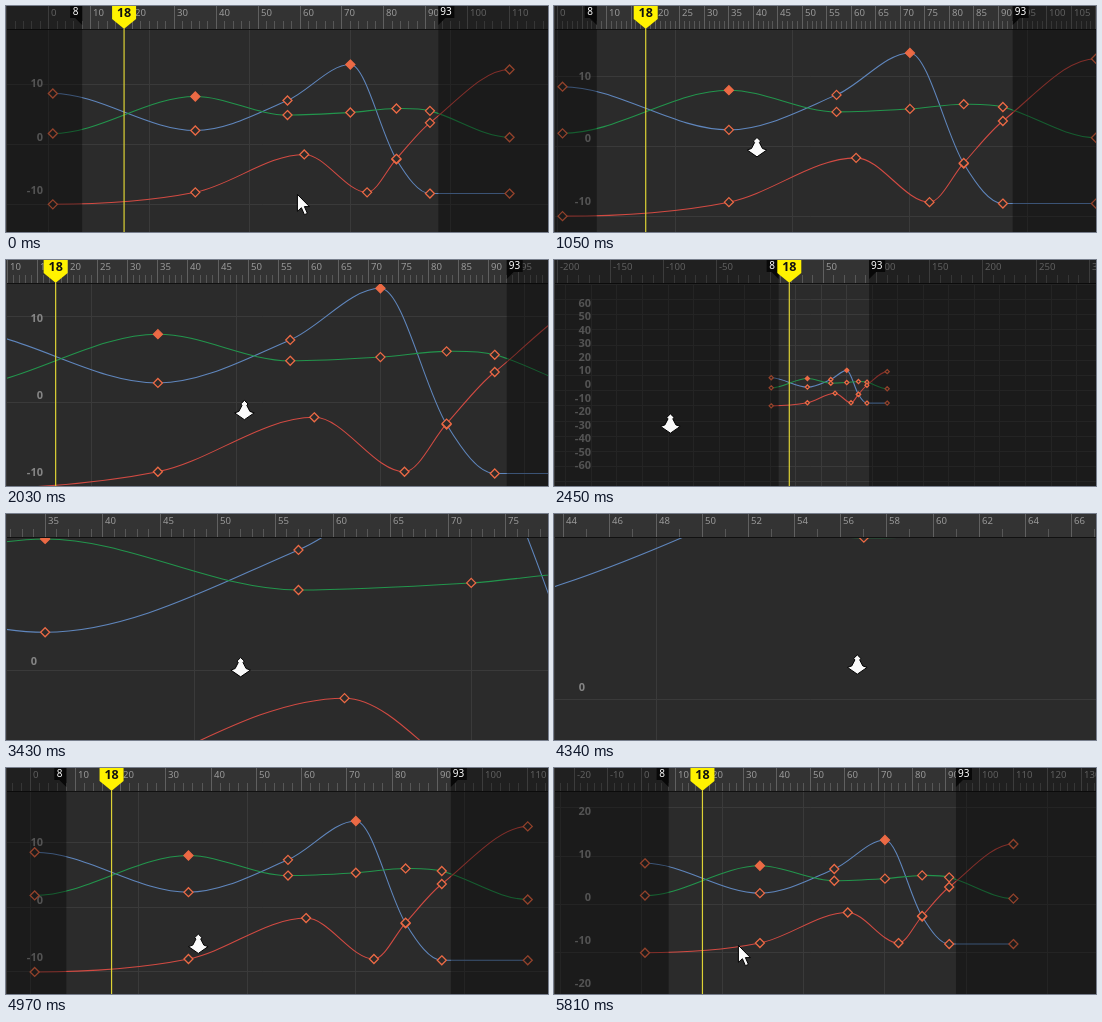
Recreate the animation shown at these times as an HTML page. Size 542x226 px, loop 8.05 s.

```html
<!DOCTYPE html>
<html lang="en">
<head>
<meta charset="utf-8">
<title>Curve editor zoom</title>
<style>
html, body { margin: 0; width: 100%; height: 100%; overflow: hidden; background: #2b2b2b; }
svg { display: block; }
text { font-family: "Noto Sans", "Open Sans", sans-serif; }
.ruler { font-size: 9.6px; fill: #999; }
.value { font-size: 11px; font-weight: 700; fill: #858585; text-anchor: end; }
.limit { font-size: 10px; font-weight: 500; fill: #fff; }
.now { font-size: 12.5px; font-weight: 700; fill: #111; text-anchor: middle; }
.curve { fill: none; stroke-width: 1.05; }
.key { stroke: #ec6a45; stroke-width: 1.3; }
</style>
</head>
<body>
<svg id="stage" width="542" height="226" viewBox="0 0 542 226"></svg>
<script>
const W = 542, H = 226, TOP = 23, LOOP = 8050, STEP = 70;
const START = 8, NOW = 18, END = 93;
const DRAG = { from: 490, to: 5740 };
const PIVOT = { x: 275.2, y: 128, frame: 55.5, value: 1.74 };
const stage = document.getElementById("stage");

const smooth = u => u * u * (3 - 2 * u);
const out = power => u => 1 - (1 - u) ** power;
const mix = (a, b, u) => a + (b - a) * u;

// Each move brings the cursor and the zoom (pixels per frame) to new values.
const rest = { x: 291, y: 188, scale: 4.19 };
const moves = [
  { from: 0, to: 350, x: 190, y: 141, scale: 4.19 },
  { from: 980, to: 1400, x: 360, y: 136, scale: 34 },
  { from: 1610, to: 2450, x: 116, y: 163, scale: 1.064 },
  { from: 2520, to: 2730, x: 112, y: 163, scale: 1.02 },
  { from: 3150, to: 3850, x: 325, y: 145, scale: 29.4, glide: out(1.67), ease: out(2.5) },
  { from: 4270, to: 5250, x: 184, y: 177, scale: 3.38, glide: out(2.3), ease: out(1.6) }
];

function pose(t) {
  let { x, y, scale } = rest;
  for (const m of moves) {
    if (t <= m.from) break;
    const u = Math.min(1, (t - m.from) / (m.to - m.from));
    const { glide = smooth, ease = smooth } = m;
    x = mix(x, m.x, glide(u));
    y = mix(y, m.y, glide(u));
    scale *= (m.scale / scale) ** ease(u);
  }
  return { x, y, scale };
}

// frame, value, selected
const curves = [
  { color: "#5f86bd", keys: [[1, 8.5], [35, 2.33], [57, 7.33], [72, 13.33, 1], [83, -2.5], [91, -8.2], [110, -8.2]] },
  { color: "#22954c", keys: [[1, 1.83], [35, 8, 1], [57, 4.9], [72, 5.33], [83, 6], [91, 5.6], [110, 1.2]] },
  { color: "#d24a42", keys: [[1, -10], [35, -8], [61, -1.67], [76, -8], [83, -2.4], [91, 3.6], [110, 12.5]] }
];

// Tangents are flat at the ends and at every peak or valley.
function slope(keys, i) {
  const k = keys[i], a = keys[i - 1], b = keys[i + 1];
  if (!a || !b || (k[1] - a[1]) * (b[1] - k[1]) <= 0) return 0;
  return (b[1] - a[1]) / (b[0] - a[0]);
}

const crisp = v => Math.floor(v) + 0.5;
const rect = (x, y, w, h, fill, extra = "") =>
  `<rect x="${x}" y="${y}" width="${Math.max(0, w)}" height="${h}" fill="${fill}" ${extra}/>`;
const line = (x1, y1, x2, y2, color, w = 1) =>
  `<path d="M${x1} ${y1}L${x2} ${y2}" stroke="${color}" stroke-width="${w}"/>`;
const text = (cls, x, y, s) => `<text class="${cls}" x="${x}" y="${y}">${s}</text>`;
const shape = (d, fill, extra = "") => `<path d="${d}" fill="${fill}" ${extra}/>`;

function grid(view) {
  let svg = "";
  for (let f = Math.ceil(view.first / 24) * 24; f <= view.last; f += 24) {
    const x = crisp(view.x(f));
    svg += line(x, TOP, x, H, "#3a3a3a");
  }
  for (let v = -80; v <= 80; v += 10) {
    const y = crisp(view.y(v));
    if (y > TOP && y < H) svg += line(0, y, W, y, "#3a3a3a");
  }
  return svg;
}

function values(view) {
  const shown = [];
  for (let v = -80; v <= 80; v += 10) {
    const y = mix(69, view.y(v), 0.892);
    if (y > 32 && y < 217) shown.push([v, y]);
  }
  const right = shown.some(([v]) => v) ? 37 : 31;
  return shown.map(([v, y]) => text("value", right, y + 4, v)).join("");
}

function ruler(view) {
  const major = [1, 2, 5, 10, 50].find(n => n * view.scale > 23.12);
  const minor = major < 10 ? 1 : major / 5;
  let svg = rect(0, 0, W, TOP, "#333");
  for (let f = Math.floor(view.first / major) * major; f <= view.last; f += minor) {
    const x = crisp(view.x(f)), big = f % major === 0;
    if (x < 1) continue;
    svg += line(x, big ? 0 : 15, x, TOP, big ? "#606060" : "#575757");
    if (big) svg += text("ruler", x + 2.5, 9.5, f);
  }
  return svg + rect(0, TOP, W, 1, "#111");
}

function drawCurves(view) {
  let lines = "", marks = "";
  const r = Math.min(4.5, 2 + (view.scale - 1) * 1.05);
  for (const { color, keys } of curves) {
    let d = "";
    keys.forEach(([f, v, selected], i) => {
      const x = view.x(f), y = view.y(v);
      if (i) {
        const [pf, pv] = keys[i - 1], h = (f - pf) / 3;
        d += `C${view.x(pf + h)} ${view.y(pv + slope(keys, i - 1) * h)} ` +
          `${view.x(f - h)} ${view.y(v - slope(keys, i) * h)} ${x} ${y}`;
      } else d = `M${x} ${y}`;
      marks += shape(`M${x} ${y - r}l${r} ${r}l${-r} ${r}l${-r} ${-r}z`,
        selected ? "#ec6a45" : "#2b2b2b", 'class="key"');
    });
    lines += `<path class="curve" d="${d}" stroke="${color}"/>`;
  }
  return `<g clip-path="url(#plot)">${lines}${marks}</g>`;
}

function markers(view) {
  const a = view.x(START), b = view.x(END), n = view.x(NOW);
  return shape(`M${a} 0V19L${a - 7} 12H${a - 12}V0z`, "#080808") +
    text("limit", a - 9.5, 9, START) +
    shape(`M${b} 0V19L${b + 7} 12H${b + 16}V0z`, "#080808") +
    text("limit", b + 2, 9, END) +
    line(n, 20, n, H, "#ddd235", 1.2) +
    shape(`M${n - 12} 0H${n + 12}V13L${n + 1} 22H${n - 1}L${n - 12} 13z`, "#fff200") +
    text("now", n, 11, NOW);
}

function cursor({ x, y }, dragging) {
  const d = dragging
    ? "M0-9.5L3.6-6L2.4-4.5L5.5 1.5L9.8 3L0 9.8L-9.8 3L-5.5 1.5L-2.4-4.5L-3.6-6z"
    : "M0 0V17L4 13.3L7 20.3L10 19L7 12.2H12z";
  return `<g transform="translate(${x + 0.4} ${y + 0.4})">` +
    shape(d, "#fafafa", 'stroke="#000" stroke-linejoin="round"') + "</g>";
}

function draw(t) {
  const now = pose(t), { scale } = now, p = PIVOT;
  const view = {
    scale,
    x: f => p.x + scale * (f - p.frame),
    y: v => p.y - 1.43 * scale * (v - p.value),
    first: p.frame - p.x / scale,
    last: p.frame + (W - p.x) / scale
  };
  const a = view.x(START), b = view.x(END), dim = 'fill-opacity=".38"';
  stage.innerHTML =
    `<clipPath id="plot">${rect(0, TOP + 1, W, H, "#000")}</clipPath>` +
    rect(0, 0, W, H, "#2b2b2b") + grid(view) + values(view) + drawCurves(view) + ruler(view) +
    rect(0, 0, a, H, "#000", dim) + rect(b, 0, W - b, H, "#000", dim) +
    markers(view) + rect(0, 0, 1, H, "#3a3a3a") +
    cursor(now, t >= DRAG.from && t < DRAG.to);
}

const began = performance.now();
let last = -1;
function tick() {
  const t = Math.floor((performance.now() - began) % LOOP / STEP) * STEP;
  if (t !== last) draw(last = t);
  requestAnimationFrame(tick);
}
tick();
</script>
</body>
</html>
```
